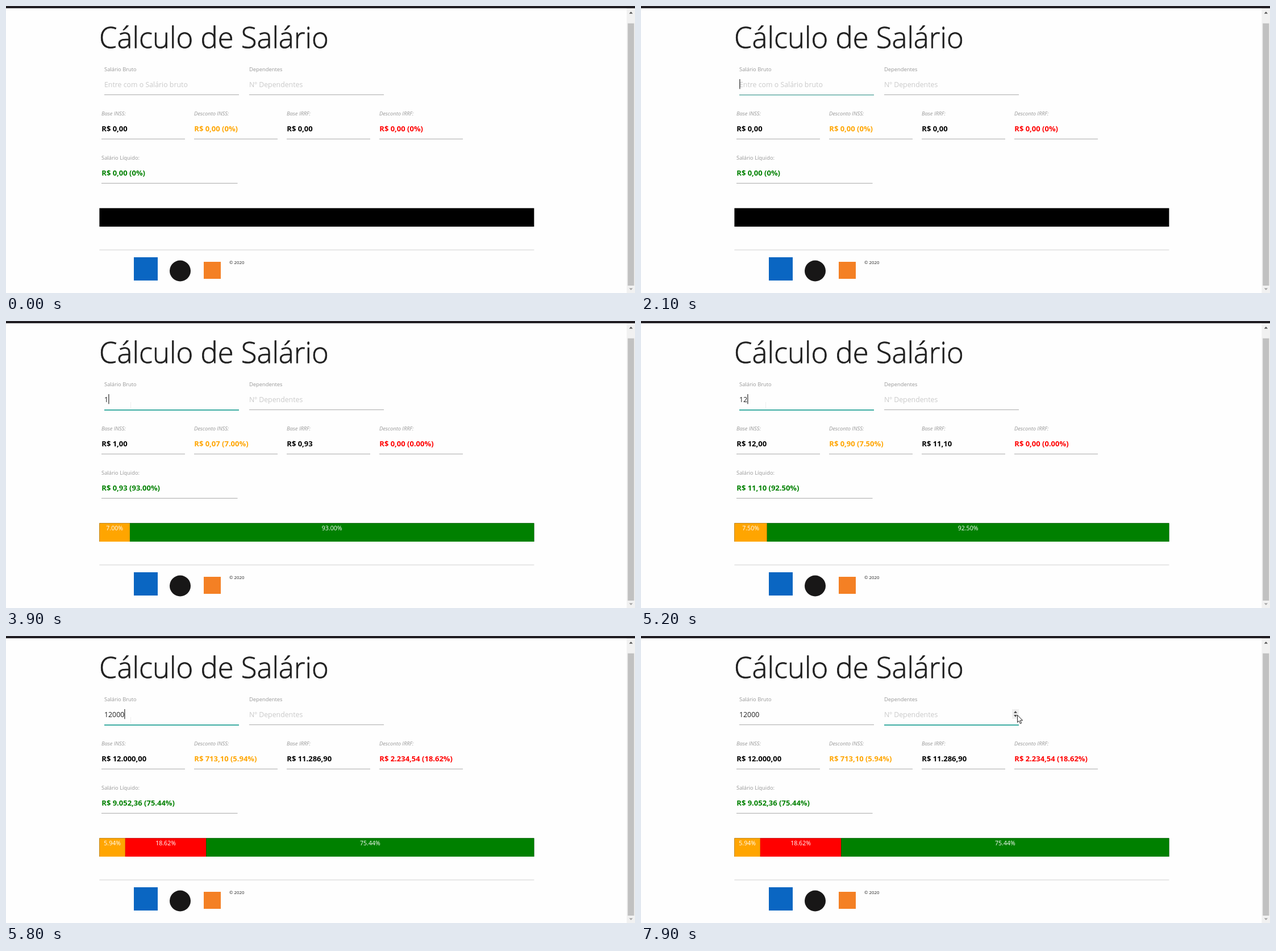
Recreate the animation shown at these times as an HTML page. Size 1107 by 506 pixels, loop 8 s.

```html
<!DOCTYPE html>
<html lang="pt-BR">
<head>
<meta charset="utf-8">
<title>Cálculo de Salário</title>
<style>
html, body { margin: 0; width: 100%; height: 100%; overflow: hidden; background: #fefefe; }
svg { display: block; width: 100%; height: 100%; }
text { font-family: "Open Sans", "Noto Sans", sans-serif; white-space: pre; }
.title { font-size: 50.8px; font-weight: 300; fill: #212121; stroke: #212121; stroke-width: .75px; }
.label { font-size: 9.35px; fill: #979797; }
.italic { font-style: italic; }
.input { font-size: 12.35px; fill: #212121; }
.hint { fill: #cacaca; }
.value { font-size: 13px; font-weight: 700; }
.share { font-size: 10.6px; font-weight: 500; fill: #fff; text-anchor: middle; }
.note { font-size: 7.8px; fill: #212121; }
</style>
</head>
<body>
<svg id="stage" viewBox="0 0 1107 506"></svg>
<script>
const LOOP = 8000;
const GREY = '#9e9e9e';
const HAIR = .87;
const BAR = { x: 164.4, y: 356.4, width: 765, height: 32.6 };
const stage = document.getElementById('stage');

function add(tag, attrs, content = '') {
  const el = document.createElementNS('http://www.w3.org/2000/svg', tag);
  set(el, attrs);
  el.textContent = content;
  stage.append(el);
  return el;
}
function set(el, attrs) {
  for (const key in attrs) el.setAttribute(key, attrs[key]);
}
const rect = (x, y, width, height, fill) => add('rect', { x, y, width, height, fill });
const path = (d, fill, more = {}) => add('path', { d, fill, ...more });
const text = (x, y, cls, content, more = {}) => add('text', { x, y, class: cls, ...more }, content);
const show = (el, on) => el.setAttribute('visibility', on ? 'visible' : 'hidden');

// Page frame and scrollbar
rect(0, 0, 1107, 506, '#fefefe');
rect(1092.4, 4, 14.6, 502, '#f1f1f1');
rect(1094.2, 30.6, 11.2, 462.4, '#c1c1c1');
path('M1096.7 13.6h6.4l-3.2-3.6z', '#505050');
path('M1096.7 497.5h6.4l-3.2 3.6z', '#a3a3a3');
rect(0, 0, 1107, 4, '#221f24');

text(164, 74, 'title', 'Cálculo de Salário');

// Editable fields
function field(x, label, hint) {
  text(x, 115, 'label', label);
  const placeholder = text(x, 143, 'input hint', hint);
  rect(x, 156.1, 237, HAIR, GREY);
  const line = rect(x, 156.1, 237, 2 * HAIR, '#26a69a');
  return { x, placeholder, line };
}
const gross = field(173, 'Salário Bruto', 'Entre com o Salário bruto');
const deps = field(428, 'Dependentes', 'Nº Dependentes');
const typed = text(173, 143, 'input', '');

// Read-only results
function result(x, y, width, label, fill, cls = 'label italic') {
  text(x, y - 28, cls, label);
  rect(x, y + 13.1, width, HAIR, GREY);
  return text(x + .3, y, 'value', '', { fill });
}
const inssBase = result(168, 221, 147, 'Base INSS:', '#000');
const inssCut = result(331, 221, 147, 'Desconto INSS:', '#ffa500');
const irrfBase = result(494, 221, 147, 'Base IRRF:', '#000');
const irrfCut = result(657, 221, 147, 'Desconto IRRF:', '#f00');
const netPay = result(168, 299, 239.5, 'Salário Líquido:', '#008000', 'label');

// Stacked bar
rect(BAR.x, BAR.y, BAR.width, BAR.height, '#000');
const parts = ['#ffa500', '#f00', '#008000'].map(fill => ({
  box: rect(BAR.x, BAR.y, 0, BAR.height, fill),
  tag: text(0, 369, 'share', '')
}));

// Footer
rect(164.4, 429.6, 765, HAIR, '#c8c8c8');
rect(225, 443, 42, 41, '#0a66c2');
add('circle', { cx: 306.5, cy: 467, r: 18.5, fill: '#181717' });
rect(348, 451, 30, 30, '#f48024');
text(393, 455, 'note', '© 2020');

// Spinner, caret and pointers
const spinner = [
  rect(653, 129, 12, 17, '#efefef'),
  path('M656 136h6l-3-4z', '#505050'),
  path('M656 139h6l-3 4z', '#505050')
];
const caret = rect(173, 129, 1, 17.3, '#000');
const beam = rect(219, 143, 1, 12, '#efefef');
const arrow = path('M.5 .5V13.3L3.4 10.6L5.5 15.5L7.6 14.6L5.5 9.8H9.6Z', '#fff',
  { stroke: '#000', 'stroke-width': HAIR });

// Payroll rules
const INSS = [[1045, .075], [2089.6, .09], [3134.4, .12], [6101.06, .14]];
const IRRF = [[4664.68, .275, 869.36], [3751.05, .225, 636.13], [2826.65, .15, 354.8], [1903.98, .075, 142.8]];

function payroll(pay) {
  let floor = 0, sum = 0;
  for (const [top, rate] of INSS) {
    sum += Math.max(0, Math.min(pay, top) - floor) * rate;
    floor = top;
  }
  const inss = +sum.toFixed(2);
  const base = pay - inss;
  const [, rate, off] = IRRF.find(([min]) => base > min) || [0, 0, 0];
  const irrf = +(base * rate - off).toFixed(2);
  return { inss, base, irrf, net: base - irrf };
}
const money = n => 'R$ ' + n.toFixed(2).replace('.', ',').replace(/\B(?=(\d{3})+,)/g, '.');

// Timeline
const KEYS = [[3900, '1'], [5200, '12'], [5500, '120'], [5700, '1200'], [5800, '12000']];
const CARET = [[2100, 2600], [3100, 3500], [3900, 4400], [4900, 6300], [6900, 7900]];
const ENTER = 2100, SWITCH = 7400;
const ENTRY_PATH = [[1300, 21, 21], [1600, 191, 107]];
const EXIT_PATH = [[7600, 676, 144], [7700, 698, 146], [7800, 682, 143], [7900, 662, 139]];

const within = (t, a, b) => t >= a && t < b;
const ramp = (t, from) => Math.max(0, Math.min(1, (t - from + 100) / 200));

function along(points, t) {
  const last = points.length - 1;
  let i = 0;
  while (i < last - 1 && t > points[i + 1][0]) i++;
  const [t0, x0, y0] = points[i], [t1, x1, y1] = points[i + 1];
  const k = Math.min(1, (t - t0) / (t1 - t0));
  return [x0 + (x1 - x0) * k, y0 + (y1 - y0) * k];
}

function fill(entry) {
  const pay = Number(entry);
  const { inss, base, irrf, net } = payroll(pay);
  const share = n => pay ? (n / pay * 100).toFixed(2) + '%' : '0%';
  const both = n => `${money(n)} (${share(n)})`;
  typed.textContent = entry;
  show(gross.placeholder, !entry);
  inssBase.textContent = money(pay);
  inssCut.textContent = both(inss);
  irrfBase.textContent = money(base);
  irrfCut.textContent = both(irrf);
  netPay.textContent = both(net);
  let x = BAR.x;
  [inss, irrf, net].forEach((n, i) => {
    const width = pay ? BAR.width * n / pay : 0;
    set(parts[i].box, { x, width });
    set(parts[i].tag, { x: x + width / 2 });
    parts[i].tag.textContent = n > 0 ? share(n) : '';
    x += width;
  });
}

let shown = null;
function draw(time) {
  const t = Math.floor(time / 100) * 100;
  const key = KEYS.filter(([at]) => t >= at).pop();
  const entry = key ? key[1] : '';
  if (entry !== shown) fill(shown = entry);

  const inDeps = t >= SWITCH;
  set(gross.line, { opacity: t < ENTER ? 0 : inDeps ? 1 - ramp(t, SWITCH) : ramp(t, ENTER) });
  set(deps.line, { opacity: inDeps ? ramp(t, SWITCH) : 0 });
  set(caret, { x: (inDeps ? deps.x : gross.x + 7 * entry.length) + .4 });
  show(caret, CARET.some(([a, b]) => within(t, a, b)));
  show(beam, within(t, 2200, 6900));
  spinner.forEach(el => show(el, t >= 7200));

  const entering = within(t, 1300, 1700);
  show(arrow, entering || t >= 7600);
  const [x, y] = along(entering ? ENTRY_PATH : EXIT_PATH, t);
  set(arrow, { transform: `translate(${Math.round(x)} ${Math.round(y)})` });
}

const start = performance.now();
function tick() {
  draw((performance.now() - start) % LOOP);
  requestAnimationFrame(tick);
}
tick();
</script>
</body>
</html>
```
